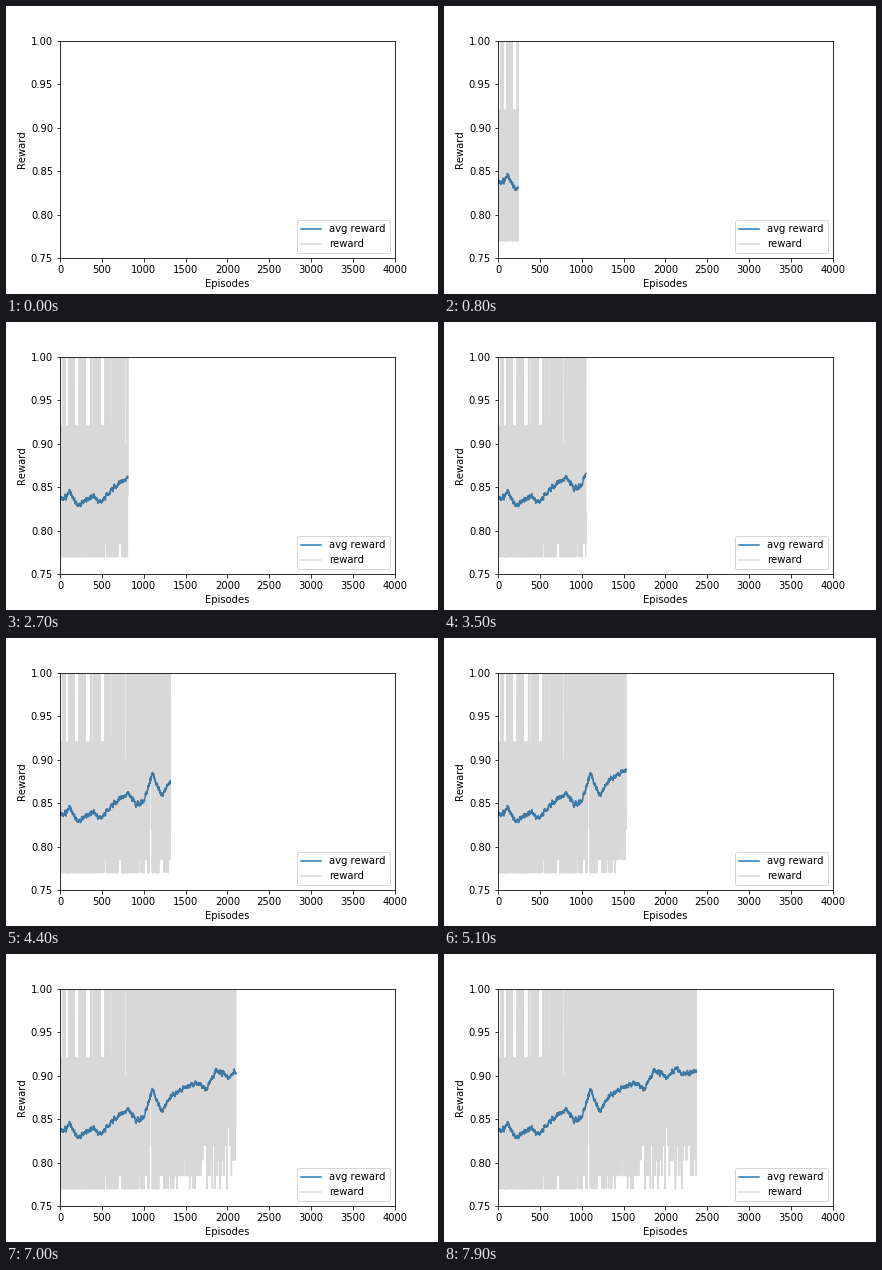
Animation of 432 by 288 pixels, one loop 8000 ms. Source, as a matplotlib script:

```python
import numpy as np
import matplotlib.pyplot as plt
from matplotlib.animation import FuncAnimation

FRAMES, STEP = 80, 30
N = FRAMES * STEP
rng = np.random.default_rng(12)
episodes = np.arange(N)


def fade(start, end, middle, width):
    """Logistic change from one value to another over the episodes."""
    return end + (start - end) / (1 + np.exp((episodes - middle) / width))


def make_average():
    """Trend through a few key points plus short correlated jitter."""
    x = [0, 70, 110, 215, 390, 500, 610, 820, 910, 1010, 1105,
         1220, 1330, 1500, 1640, 1750, 1870, 2030, 2130, 2200, N]
    y = [.837, .837, .846, .828, .840, .832, .847, .862, .847, .853, .884,
         .858, .877, .887, .891, .885, .906, .898, .909, .900, .906]
    jitter = np.zeros(N)
    for i in range(1, N):
        jitter[i] = 0.85 * jitter[i - 1] + rng.normal(0, 0.0008)
    return np.interp(episodes, x, y) + jitter


def make_rewards():
    """Discrete rewards: low outcomes fade out, perfect ones become common."""
    r = rng.choice([0.92, 0.90, 0.87, 0.84], N)
    chances = {
        0.820: 0.15,
        0.803: fade(0.10, 0.06, 1800, 60),
        0.785: fade(0.14, 0.04, 1700, 50),
        0.770: fade(0.22, 0.01, 1020, 130),
        1.000: fade(0.06, 0.30, 1000, 90),
    }
    for level, chance in chances.items():
        r[rng.random(N) < chance] = level
    return r


average = make_average()
rewards = make_rewards()

plt.rcParams.update({"font.family": "DejaVu Sans", "text.kerning_factor": 6})
fig, ax = plt.subplots(figsize=(6, 4), dpi=72)
fig.subplots_adjust(left=0.125, right=0.9, bottom=0.125, top=0.88)
avg_line, = ax.plot([], [], color="tab:blue", label="avg reward")
reward_line, = ax.plot([], [], color="gray", alpha=0.3, label="reward")
ax.set(xlim=(0, 4000), ylim=(0.75, 1.0), xlabel="Episodes", ylabel="Reward")
ax.legend(loc="lower right")


def update(frame):
    n = frame * STEP
    for line, data in ((avg_line, average), (reward_line, rewards)):
        line.set_data(episodes[:n], data[:n])
    return avg_line, reward_line


anim = FuncAnimation(fig, update, frames=FRAMES, interval=100,
                     repeat=True, repeat_delay=0)
plt.show()
```
